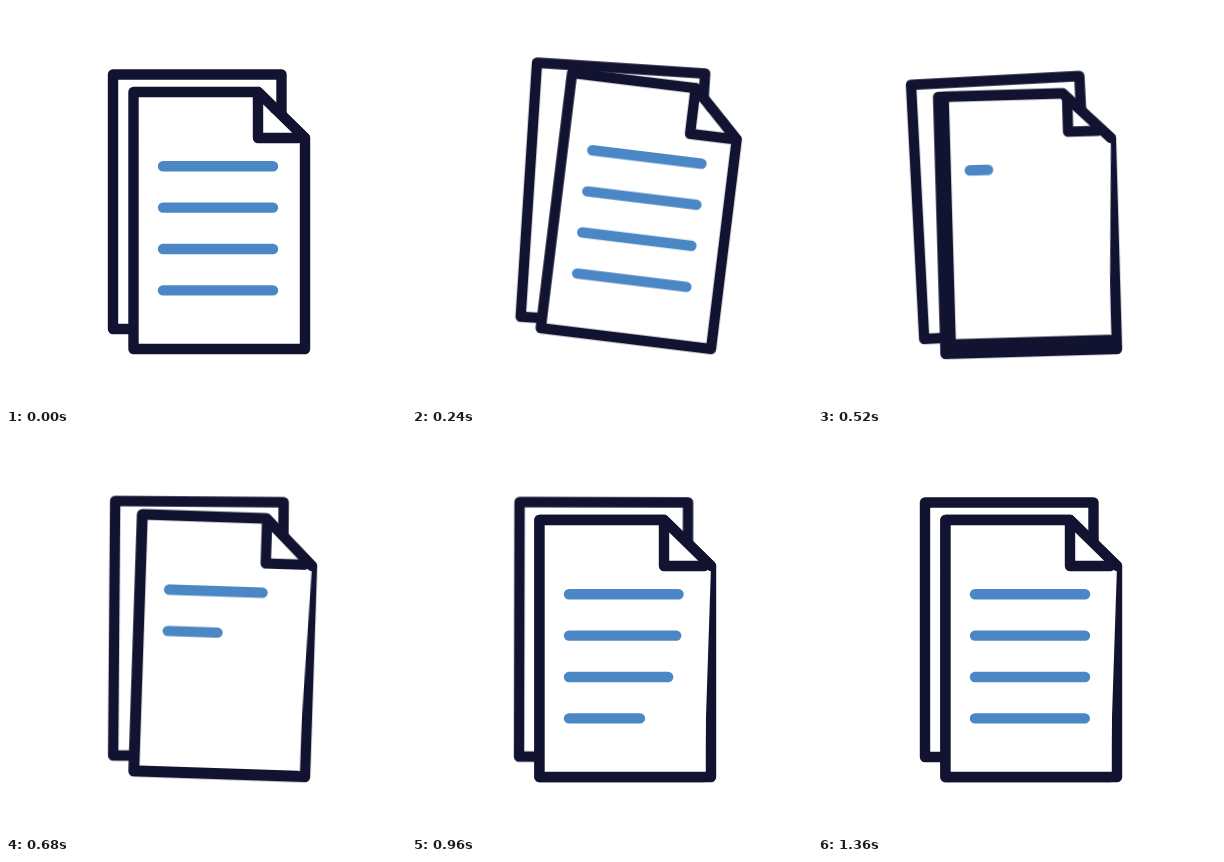
An HTML page without scripts that plays this animation: 400 by 400 pixels, repeating every 1520 ms.

```html
<!DOCTYPE html>
<html lang="en">
<head>
<meta charset="utf-8">
<title>Turning pages</title>
<style>
  html, body { margin: 0; width: 100%; height: 100%; overflow: hidden; background: #fff; }
  svg { display: block; width: 100%; height: 100%; }

  svg {
    --loop: 1520ms;
    --expo-out: cubic-bezier(.16, 1, .3, 1);
    fill: none;
    stroke: #121331;
    stroke-width: 10.4;
    stroke-linecap: round;
    stroke-linejoin: round;
  }
  .page, .peel { fill: #fff; }
  .lines { stroke: #4b86c5; }

  .back, .front {
    transform-origin: 299px 343px;
    animation: sway-back var(--loop) ease-in-out infinite;
  }
  .front { animation-name: sway-front; }
  .peel { animation: peel var(--loop) var(--expo-out) infinite; }
  .fold { animation: fold var(--loop) var(--expo-out) infinite; }
  .old { animation: leave var(--loop) infinite; }
  .new { animation: enter var(--loop) infinite; }
  .new path {
    stroke-dasharray: 110 200;
    animation: write var(--loop) var(--expo-out) calc(var(--i) * 120ms - var(--loop)) infinite;
  }

  @keyframes sway-front {
    0% { transform: rotate(0); }
    15.8% { transform: rotate(7deg); }
    27% { transform: rotate(-3.1deg); }
    46.7% { transform: rotate(2deg); }
    62.5%, 100% { transform: rotate(0); }
  }
  @keyframes sway-back {
    0% { transform: rotate(0); }
    20.7% { transform: rotate(4.15deg); }
    33.2% { transform: rotate(-3deg); }
    52.6% { transform: rotate(2.2deg); }
    63.2% { transform: rotate(.12deg); }
    89.5%, 100% { transform: rotate(0); }
  }
  /* The folded corner sweeps down to the opposite corner of the page. */
  @keyframes peel {
    0%, 16.8% { d: path("M292 132H252V86H252L299 132"); }
    56.3%, 100% { d: path("M292 343H127.5V86H252L299 132"); }
  }
  @keyframes fold {
    0%, 26.6% { d: path("M269 102.6H269V102.6"); }
    66.1%, 100% { d: path("M292 132H252V86"); }
  }
  @keyframes write {
    0%, 33% { stroke-dashoffset: 111; }
    76.4%, 100% { stroke-dashoffset: 0; }
  }
  @keyframes leave {
    0%, 32.8% { visibility: visible; }
    32.9%, 100% { visibility: hidden; }
  }
  @keyframes enter {
    0%, 32.8% { visibility: hidden; }
    32.9%, 100% { visibility: visible; }
  }
</style>
</head>
<body>
<svg viewBox="0 0 400 400">
  <path class="back" d="M275.5 118V68.5H107V323H127"/>
  <g class="front">
    <path class="page" d="M127.5 343V86H252L299 132V343Z"/>
    <path class="lines old" d="M157 160.2h110m-110 41.4h110m-110 41.4h110m-110 41.4h110"/>
    <path class="peel" d="M292 132H252V86H252L299 132"/>
    <path class="fold" d="M292 132H252V86"/>
    <g class="lines new">
      <path style="--i:0" d="M157 160.2h110"/>
      <path style="--i:1" d="M157 201.6h110"/>
      <path style="--i:2" d="M157 243h110"/>
      <path style="--i:3" d="M157 284.4h110"/>
    </g>
  </g>
</svg>
</body>
</html>
```
